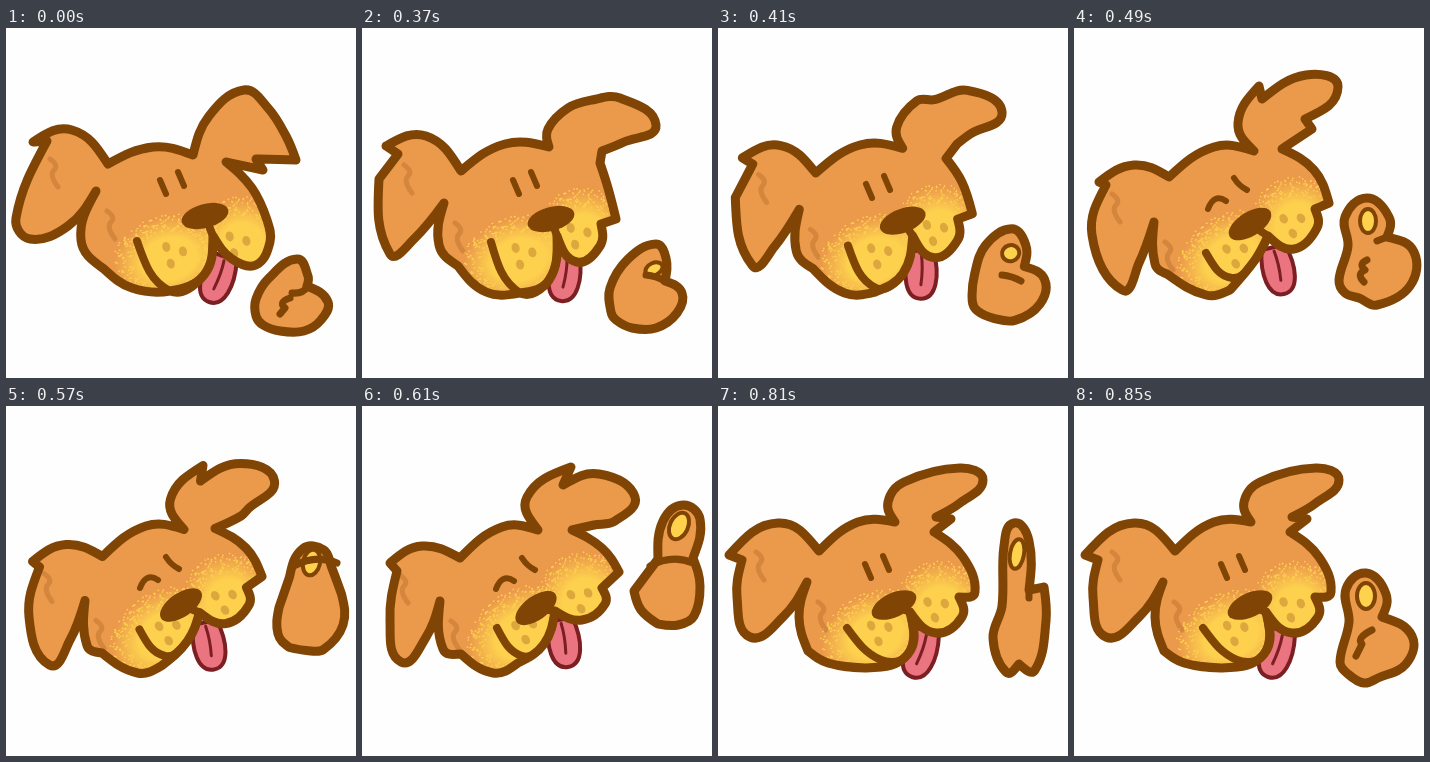
Write an HTML page that moves like this. It is 350 px wide and 350 px high and loops after 0.89 s.

```html
<!DOCTYPE html>
<html lang="en">
<head>
<meta charset="utf-8">
<title>Thumbs-up dog</title>
<style>
  html, body { margin: 0; width: 100%; height: 100%; overflow: hidden; background: #fefefe; }
  svg { display: block; width: 100%; height: 100%; }
  path { fill: none; stroke-linecap: round; stroke-linejoin: round; }
  .line { stroke: #804504; stroke-width: 9; }
  .fur { fill: #eb994b; }
  .mark { stroke: #bd7530; stroke-opacity: .5; stroke-width: 5; }
  .spot { fill: #cf9636; fill-opacity: .7; }
  .tongue { fill: #ea747f; stroke: #7c1f22; stroke-width: 4; }
</style>
</head>
<body>
<svg viewBox="0 0 350 350">
  <defs>
    <clipPath id="inside"><path id="clip"/></clipPath>
    <radialGradient id="glow">
      <stop offset=".5" stop-color="#fdd04e"/>
      <stop offset="1" stop-color="#fdd04e" stop-opacity="0"/>
    </radialGradient>
    <g id="patch">
      <circle r="1" fill="url(#glow)"/>
      <path id="dust" stroke="#fdd04e" stroke-width=".035"/>
    </g>
    <path id="squiggle" class="mark" d="M-4 -14Q5 -8 0 -3T4 14"/>
    <g id="freckles"></g>
  </defs>
  <g id="tongue">
    <path class="tongue" d="M-12 -48C-19 -24 -16 0 0 0S19 -24 12 -48Z"/>
    <path d="M0 -44Q2 -30 0 -14" stroke="#7c1f22" stroke-width="3"/>
  </g>
  <path id="fill" class="fur"/>
  <g clip-path="url(#inside)">
    <use id="patchL" href="#patch"/>
    <use id="patchR" href="#patch"/>
    <use id="earMark" href="#squiggle"/>
    <use id="cheekMark" href="#squiggle"/>
    <use id="frecklesL" href="#freckles"/>
    <use id="frecklesR" href="#freckles"/>
  </g>
  <path id="head" class="line"/>
  <path id="mouth" class="line" style="stroke-width:8"/>
  <path id="eyes" class="line" style="stroke-width:6"/>
  <ellipse id="nose" rx="24" ry="12" fill="#804504"/>
  <path id="hand" class="line fur"/>
  <ellipse id="nail" fill="#ffd24d" stroke="#804504" stroke-width="4"/>
  <path id="folds" class="line" style="stroke-width:7"/>
</svg>
<script>
const $ = id => document.getElementById(id);
const LOOP = 890;

// Outlines are key points; "!" marks a sharp corner.
// Head order: crown, right ear, cheek and muzzle, chin, left ear.
const points = s => s.trim().split(/\s+/).map(p => {
  const [x, y] = p.split(",").map(parseFloat);
  return { x, y, corner: p.endsWith("!") };
});

const pose = (head, hand, rest) => ({ head: points(head), hand: points(hand), wink: false, ...rest });

const rest = pose(
  `102,136! 147,119 187,127! 203,88 238,62 262,80 280,108 290,132! 250,131! 257,142! 220,134!
   246,160 261,192 264,214 250,237 226,231 207,208! 198,247 164,263 126,260 98,241! 75,212
   90,163! 62,198 24,211 10,190 41,113! 27,114! 66,102`,
  "250,288 250,271 263,250 291,231 302,248 301,258! 322,274 315,292 298,303 274,303 257,297",
  { nose: [199, 188, -15], eyes: [166, 155], smile: [131, 213, 164, 263], tongue: [203, 274, 20],
    nail: [292, 241, 0, 0, -25], folds: "M301 259Q297 266 286 265M284 270Q272 274 279 280L274 286" });

const turn = pose(
  `99,143! 143,116 187,119! 186,101 206,80 230,72 258,70 294,97 262,114 240,123! 238,135!
   246,160 254,191! 239,196! 238,218 215,234 195,208! 187,252 158,265! 124,264 96,238! 77,217
   82,175! 52,211 28,226 17,151! 36,126! 24,118! 64,108`,
  "249,284 248,260 266,231 294,216 304,230 303,253! 320,265 315,285 294,300 270,300 254,292",
  { nose: [189, 191, -15], eyes: [163, 155], smile: [129, 214, 158, 265], tongue: [199, 273, 8],
    nail: [292, 241, 9, 6, -25], folds: "M303 253Q294 248 284 247" });

const wink = pose(
  `95,149! 140,119 180,123! 164,95 185,58! 188,71! 232,47 264,59 231,91! 238,101! 208,121!
   240,142 255,175! 241,181! 243,200 220,221 194,208! 181,232 156,262! 132,267 93,246! 81,236
   80,194! 65,235 48,262 18,207 32,157! 25,154! 60,137`,
  "265,252 274,218 271,189 293,170 315,189 313,209! 340,224 336,258 303,277 285,270 271,265",
  { wink: true, nose: [176, 196, -32], eyes: [154, 167], smile: [132, 225, 158, 250], tongue: [210, 266, -13],
    nail: [294, 193, 8, 12, 0], folds: "M313 209L303 213M293 232Q284 236 291 242Q282 246 290 254" });

const cheer = pose(
  `98,152! 140,121 176,124! 165,91 209,61! 201,79! 237,68 273,91 253,115 232,119 210,124!
   240,142 257,166! 240,182! 243,198 220,214 193,205! 182,238 156,257! 131,267 99,248! 81,243
   78,195! 63,233 39,256 28,215 35,165! 28,157! 60,140`,
  "279,204 272,185! 296,153! 301,115 321,99 338,113 331,152! 338,180 332,210 316,219 296,218!",
  { wink: true, nose: [174, 202, -36], eyes: [154, 169], smile: [135, 222, 160, 250], tongue: [206, 261, -9],
    nail: [317, 120, 9, 14, 25], folds: "M288 160Q310 148 331 157" });

const lower = pose(
  `101,145! 140,116 177,116! 170,96 186,76 211,66 242,62 265,74 242,97 218,111! 233,113! 216,126!
   245,151 257,186 241,191! 244,211 218,227 192,206! 190,248 148,262! 110,257 90,245! 81,211
   89,176! 65,211 32,231 19,191 24,154! 11,149! 60,117`.replace("211,66 ", ""),
  "275,232 284,200 286,140 296,117 311,135 311,184! 326,181! 328,215 317,264 301,258! 288,266",
  { nose: [176, 199, -25], eyes: [159, 161], smile: [129, 222, 163, 254], tongue: [194, 271, 19],
    nail: [299, 148, 7, 15, 10], folds: "M311 184V192" });

const back = {
  ...lower,
  hand: points("266,256 275,216 272,183 292,167 312,188 308,211! 338,230 332,258 304,272 290,277 274,268"),
  nail: [292, 190, 9, 13, 0], folds: "M298 224Q282 232 288 238L282 250"
};

// [start ms, pose, next pose, blend]
const steps = [
  [0, rest], [370, turn], [410, turn, wink, .33], [450, turn, wink, .67],
  [490, wink], [530, wink, cheer, .5], [610, cheer], [810, lower], [850, back]
];

// Blends numbers, lists and points; anything else switches halfway.
function mix(a, b, k) {
  if (typeof a === "number") return a + (b - a) * k;
  if (Array.isArray(a)) return a.map((v, i) => mix(v, b[i], k));
  if (typeof a !== "object") return k < .5 ? a : b;
  return Object.fromEntries(Object.keys(a).map(key => [key, mix(a[key], b[key], k)]));
}

const along = (p, q, k) => ({ x: mix(p.x, q.x, k), y: mix(p.y, q.y, k) });

// Smooth path through the points, with handles in proportion to each span.
function curve(pts, closed) {
  const n = pts.length, at = i => pts[(i + n) % n];
  const sharp = i => at(i).corner || (!closed && (i === 0 || i === n - 1));
  const handle = (i, span) => {
    const p = at(i), a = at(i - 1), b = at(i + 1);
    const k = span * .36 / (Math.hypot(b.x - a.x, b.y - a.y) || 1);
    return { x: p.x + (b.x - a.x) * k, y: p.y + (b.y - a.y) * k };
  };
  const xy = p => `${p.x.toFixed(1)} ${p.y.toFixed(1)} `;
  let d = "M" + xy(pts[0]);
  for (let i = 0; i < n - !closed; i++) {
    const p = at(i), q = at(i + 1), span = Math.hypot(q.x - p.x, q.y - p.y);
    let c1 = sharp(i) ? null : handle(i, span);
    let c2 = sharp((i + 1) % n) ? null : handle(i + 1, -span);
    c1 ??= along(p, c2 ?? q, .6);
    c2 ??= along(q, c1, .6);
    d += "C" + xy(c1) + xy(c2) + xy(q);
  }
  return closed ? d + "Z" : d;
}

function center(pts) {
  const sum = key => pts.reduce((s, p) => s + p[key], 0) / pts.length;
  return { x: sum("x"), y: sum("y") };
}

function place(id, x, y, angle = 0, sx = 1, sy = sx) {
  $(id).setAttribute("transform", `translate(${x} ${y}) rotate(${angle}) scale(${sx} ${sy})`);
}

function eyePath([x, y], winking) {
  return winking
    ? `M${x - 20} ${y + 14}q6 -16 18 -8M${x + 6} ${y - 17}q5 8 13 12`
    : `M${x - 12} ${y - 3}l6 14M${x + 6} ${y - 11}l6 14`;
}

function draw(from, to = from, k = 0) {
  const p = mix(from, to, k), head = p.head;
  const outline = curve(head, true);
  ["clip", "fill", "head"].forEach(id => $(id).setAttribute("d", outline));
  $("hand").setAttribute("d", curve(p.hand, true));
  $("folds").setAttribute("d", p.folds);
  $("eyes").setAttribute("d", eyePath(p.eyes, p.wink));

  // The smile runs into the muzzle edge and up to the nose.
  const [nx, ny, tilt] = p.nose, [sx, sy, bx, by] = p.smile;
  const lip = head[16], start = { x: sx, y: sy }, base = { x: bx, y: by };
  $("mouth").setAttribute("d", curve([start, base, head[17], lip]) + `L${nx} ${ny}`);
  place("nose", nx, ny, tilt);
  place("tongue", ...p.tongue);

  const left = center([start, base, lip]), right = center(head.slice(13, 17));
  place("patchL", left.x - 4, left.y + 3, tilt, 56, 42);
  place("patchR", right.x, right.y - 4, tilt, 46, 48);
  place("frecklesL", left.x, left.y - 2, tilt);
  place("frecklesR", right.x - 6, right.y - 7, tilt);
  place("earMark", head[28].x - 18, head[28].y + 43);
  place("cheekMark", head[22].x + 15, head[22].y + 34);

  const [x, y, rx, ry, angle] = p.nail;
  place("nail", x, y, angle);
  $("nail").setAttribute("rx", rx);
  $("nail").setAttribute("ry", ry);
}

function addTexture() {
  let seed = 7, d = "";
  const rnd = () => (seed = seed * 16807 % 2147483647) / 2147483647;
  for (let i = 0; i < 350; i++) {
    const a = rnd() * Math.PI * 2, r = .65 + .4 * rnd();
    d += `M${(Math.cos(a) * r).toFixed(3)} ${(Math.sin(a) * r).toFixed(3)}h.001`;
  }
  $("dust").setAttribute("d", d);
  for (let i = 0; i < 3; i++) {
    const a = i * Math.PI * 2 / 3, dot = document.createElementNS("http://www.w3.org/2000/svg", "ellipse");
    const attrs = { class: "spot", cx: 10 * Math.cos(a), cy: 10 * Math.sin(a), rx: 4, ry: 5 };
    for (const key in attrs) dot.setAttribute(key, attrs[key]);
    $("freckles").append(dot);
  }
}

let shown, start;
function tick(now) {
  start ??= now;
  const t = (now - start) % LOOP;
  const step = steps.findLast(s => t >= s[0]);
  if (step !== shown) draw(...step.slice(1));
  shown = step;
  requestAnimationFrame(tick);
}
addTexture();
draw(rest);
requestAnimationFrame(tick);
</script>
</body>
</html>
```
